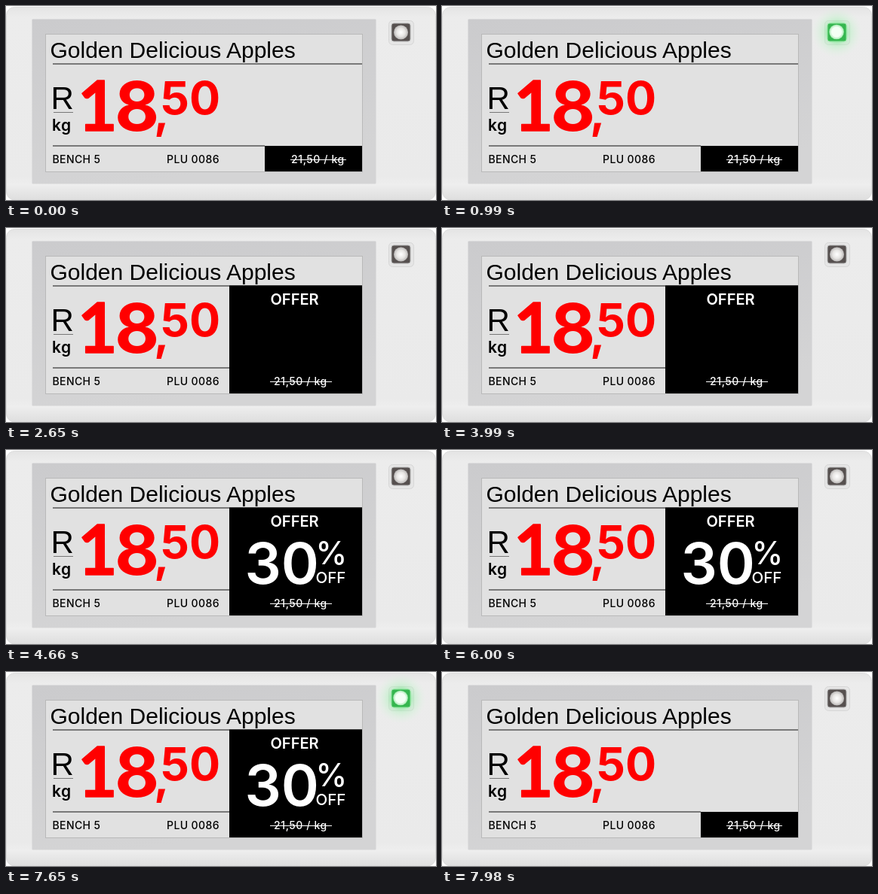
Recreate the animation shown at these times as an HTML page. Size 570 by 258 pixels, loop 8310 ms.

```html
<!DOCTYPE html>
<html lang="en">
<head>
<meta charset="utf-8">
<title>Shelf label</title>
<style>
  html, body { margin: 0; height: 100%; overflow: hidden; background: #fff; }
  svg { display: block; width: 570px; height: 258px; font-family: Inter, sans-serif; }
  .title { font-family: "Liberation Sans", Arial, sans-serif; }
  .small { font-size: 14px; font-weight: 500; letter-spacing: .4px; }
  .old { font-size: 14px; font-weight: 500; letter-spacing: .6px; fill: #fff; }
  .price { fill: #f00; font-weight: 700; }
  .white { fill: #fff; }
</style>
</head>
<body>
<svg viewBox="0 0 570 258">
  <defs>
    <linearGradient id="body" x2="0" y2="1">
      <stop offset="0" stop-color="#e4e4e4"/>
      <stop offset=".05" stop-color="#ececec"/>
      <stop offset=".88" stop-color="#eaeaea"/>
      <stop offset=".92" stop-color="#eeeeee"/>
      <stop offset="1" stop-color="#dedede"/>
    </linearGradient>
    <linearGradient id="bezel" x2=".3" y2="1">
      <stop offset="0" stop-color="#cbcbcd"/>
      <stop offset="1" stop-color="#d4d4d5"/>
    </linearGradient>
    <radialGradient id="glow">
      <stop offset=".3" stop-color="#6be884" stop-opacity=".75"/>
      <stop offset=".5" stop-color="#a8f2b6" stop-opacity=".45"/>
      <stop offset="1" stop-color="#dcf6e0" stop-opacity="0"/>
    </radialGradient>
    <radialGradient id="lens">
      <stop offset="0" stop-color="#fff"/>
      <stop offset=".6" stop-color="#e6e4e2"/>
      <stop offset="1" stop-color="#b9b7b6"/>
    </radialGradient>
    <radialGradient id="litLens">
      <stop offset=".65" stop-color="#f4fff5"/>
      <stop offset="1" stop-color="#a5eab1"/>
    </radialGradient>
  </defs>

  <!-- casing and display -->
  <rect x=".5" y="1.5" width="569" height="256.5" rx="11" fill="url(#body)" stroke="#dcdcdc"/>
  <rect x="34.5" y="17.5" width="456" height="219" rx="1" fill="url(#bezel)"/>
  <rect x="52.5" y="37.5" width="420" height="183" fill="#e1e1e1" stroke="#b9b9b9"/>

  <!-- constant content -->
  <text class="title" x="58.5" y="69" font-size="30">Golden Delicious Apples</text>
  <path d="M62 77H472M62 186H343" stroke="#111"/>
  <text class="title" x="59.5" y="137" font-size="42">R</text>
  <path d="M63 141.5H89" stroke="#777"/>
  <text x="61" y="165.5" font-size="21" font-weight="600" letter-spacing=".4">kg</text>
  <g class="price">
    <text x="95" y="166" font-size="91" font-family="Lato, sans-serif" stroke="#f00" stroke-width="1.5" stroke-linejoin="round">1</text>
    <text x="144" y="166" font-size="91">8</text>
    <text x="196" y="162" font-size="61">,</text>
    <text x="205" y="144" font-size="61">50</text>
  </g>
  <text class="small" x="61.5" y="208.5">BENCH 5</text>
  <text class="small" x="213" y="208.5">PLU 0086</text>

  <g id="regular">
    <rect x="343" y="186" width="129" height="34"/>
    <text class="old" x="378" y="208.5">21,50 / kg</text>
    <path d="M377 204.5H451" stroke="#fff"/>
  </g>

  <g id="offer">
    <rect x="296" y="76.5" width="176" height="143.5"/>
    <text class="white" x="350.5" y="102" font-size="20" font-weight="600">OFFER</text>
    <text class="old" x="355" y="208.5">21,50 / kg</text>
    <path d="M350 204.5H432" stroke="#fff"/>
    <g id="discount" class="white">
      <text x="316.5" y="178" font-size="76" font-weight="600">30</text>
      <text x="410.5" y="152" font-size="42" font-weight="500">%</text>
      <text x="410.5" y="177" font-size="20.5" font-weight="500">OFF</text>
    </g>
  </g>

  <!-- status light -->
  <rect x="507.5" y="19.5" width="33" height="32" rx="5" fill="#e6e6e6" stroke="#d6d6d6"/>
  <g id="lightOff">
    <rect x="511" y="23" width="25" height="24" rx="3" fill="#56504f" stroke="#b0b0b0"/>
    <circle cx="523.5" cy="35" r="9.5" fill="url(#lens)"/>
  </g>
  <g id="lightOn">
    <circle cx="523.5" cy="35" r="34" fill="url(#glow)"/>
    <rect x="511" y="23" width="25" height="24" rx="3" fill="#35b64f" stroke="#8be39b"/>
    <circle cx="523" cy="34.5" r="9.8" fill="url(#litLens)"/>
  </g>
</svg>
<script>
  const LOOP = 8310, BLINK = 330, FLASH = 670;
  const OFFER_START = 1980, FLASH_END = 6000, OFFER_END = 7980;
  const odd = (time, step) => Math.floor(time / step) % 2 === 1;
  const show = (id, visible) =>
    document.getElementById(id).setAttribute("visibility", visible ? "inherit" : "hidden");

  function draw(now) {
    const t = now % LOOP;
    const offer = t >= OFFER_START && t < OFFER_END;
    const flashing = offer && t < FLASH_END;
    const lit = !flashing && t < OFFER_END && odd(offer ? t - FLASH_END : t, BLINK);
    show("offer", offer);
    show("regular", !offer);
    show("discount", !(flashing && odd(t - OFFER_START, FLASH)));
    show("lightOn", lit);
    show("lightOff", !lit);
  }

  const start = performance.now();
  (function tick() {
    draw(performance.now() - start);
    requestAnimationFrame(tick);
  })();
</script>
</body>
</html>
```
